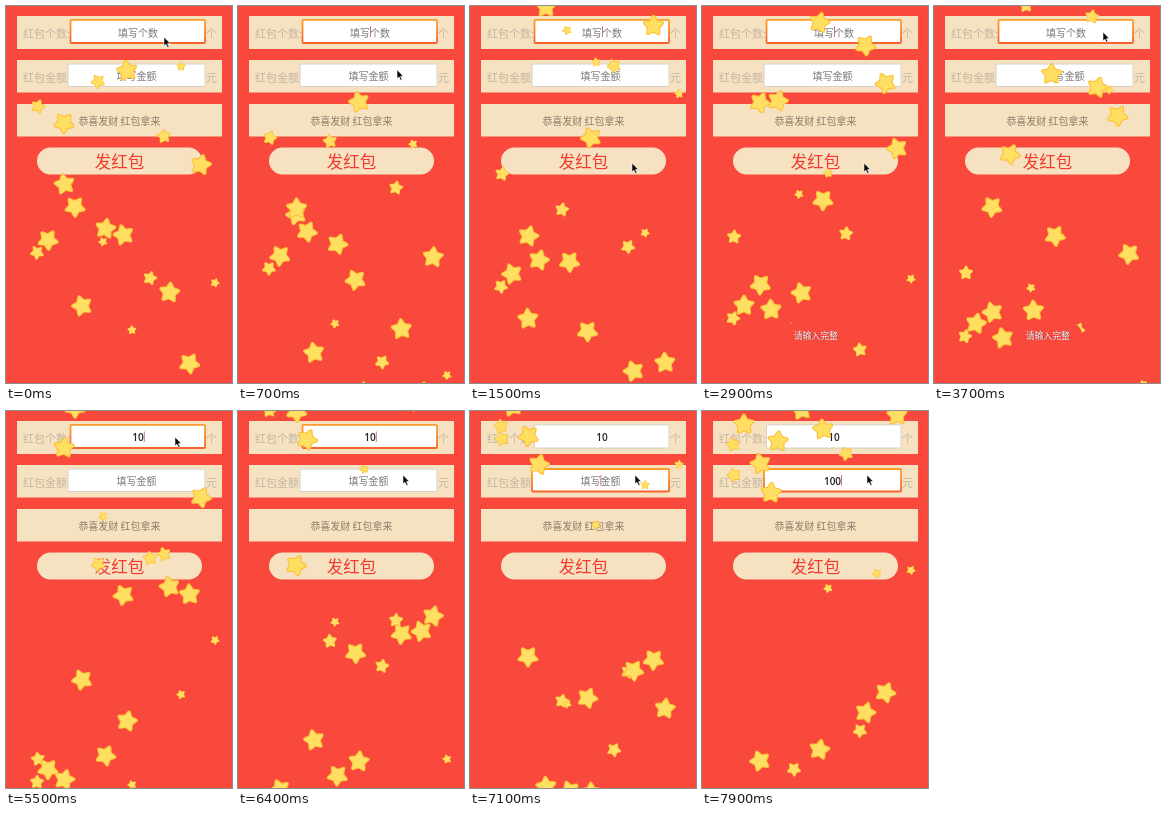
An HTML page that plays this animation: 226 px wide and 377 px high, repeating every 8 s.

```html
<!DOCTYPE html>
<html lang="zh-CN">
<head>
<meta charset="utf-8">
<style>
html, body { margin: 0; width: 100%; height: 100%; overflow: hidden; background: #f9493d; }
svg { display: block; width: 100%; height: 100%; }
text { font: 10px "Noto Sans CJK SC", "Noto Sans CJK", sans-serif; fill: #777; text-anchor: middle; dominant-baseline: central; }
.card { fill: #f6e1c1; }
.label { font-size: 11px; fill: #c3b6a3; text-anchor: start; }
.wish { font-weight: 500; fill: #8b7b69; }
.send { font-size: 16.5px; fill: #f5392f; }
.box { fill: #fff; stroke: #d8d0c6; }
.box.on { stroke: url(#glow); stroke-width: 1.8; }
.filled { font: 600 10px "Open Sans", sans-serif; fill: #222; }
#toast text { font-size: 8.8px; }
</style>
</head>
<body>
<svg viewBox="0 0 226 377">
  <defs>
    <linearGradient id="glow" x2="0" y2="1">
      <stop offset=".2" stop-color="#fb9a2c"/><stop offset="1" stop-color="#f7632f"/>
    </linearGradient>
    <g id="star" stroke-linejoin="round">
      <path class="shape" fill="#fdbd35" stroke="#fdbd35" stroke-width="3.6"/>
      <path class="shape" fill="#ffdf62" stroke="#ffdf62" stroke-width="1.6"/>
    </g>
  </defs>
  <rect width="226" height="377" fill="#f9493d"/>
  <rect class="card" x="11" y="10" width="205" height="33"/>
  <rect class="card" x="11" y="54" width="205" height="32.5"/>
  <rect class="card" x="11" y="98" width="205" height="32.5"/>
  <rect class="card" x="31" y="141.5" width="165" height="27" rx="13.5"/>
  <text class="label" x="17" y="27">红包个数:</text>
  <text class="label" x="17" y="70.5">红包金额:</text>
  <text class="label" x="200" y="27">个</text>
  <text class="label" x="200" y="70.5">元</text>
  <rect class="box" x="64.5" y="13.8" width="134.5" height="23.2" rx="1"/>
  <rect class="box" x="62" y="58" width="137" height="22.5" rx="1"/>
  <text class="value" x="132" y="26"></text>
  <text class="value" x="130.5" y="69.5"></text>
  <rect id="caret" width=".8" height="10.5" fill="#b5554c"/>
  <text class="wish" x="113.5" y="114.5">恭喜发财 红包拿来</text>
  <text class="send" x="113.5" y="155">发红包</text>
  <g id="stars"></g>
  <g id="toast">
    <rect x="80" y="317" width="68" height="24" rx="12" fill="#f9493d"/>
    <text x="114.5" y="329.5" style="fill:#6b2b26">请输入完整</text>
    <text x="114" y="329" style="fill:#fff">请输入完整</text>
  </g>
  <path id="pointer" d="M0 0V9L2 7.2L3.6 10.6L5 10L3.5 6.6H6.2Z" stroke="#fff" stroke-width=".6"/>
</svg>
<script>
const LOOP = 8000, STAGE = 377;
const $ = s => document.querySelector(s), $$ = s => [...document.querySelectorAll(s)];
const show = (el, on) => { el.style.display = on ? '' : 'none'; };

// All stars left the top edge together, HEAD_START seconds before the loop.
// Each size lists its stars as column and speed in px per second.
const HEAD_START = 28.5;
const flock = {
  21: [[121, 44.64], [58, 130.48], [195, 131.94], [58.5, 34.62], [69, 35.42], [99.5, 22.18],
    [117.5, 64.4], [42, 22.58], [163.5, 52.42], [76, 66.89], [183.5, 40.91]],
  14: [[92, 85.42], [32, 45.03], [158, 73.59], [31, 22.65], [144, 119.83]],
  9: [[175, 110.91], [97, 117.06], [209, 132.08], [126, 79.42]]
};

const outline = 'M' + Array.from({ length: 10 }, (_, i) => {
  const a = (i / 5 - .5) * Math.PI, r = i % 2 ? 4.7 : 8.7;
  return [r * Math.cos(a), r * Math.sin(a)];
}).join('L') + 'Z';
$$('.shape').forEach(p => p.setAttribute('d', outline));

const stars = Object.entries(flock).flatMap(([size, list]) =>
  list.map(([x, speed]) => {
    const el = document.createElementNS('http://www.w3.org/2000/svg', 'use');
    el.setAttribute('href', '#star');
    return { x, speed, size: +size, el: $('#stars').appendChild(el) };
  }));

function drawStars(sec) {
  stars.forEach(({ x, speed, size, el }, i) => {
    const y = speed * (HEAD_START + sec) % (STAGE + size + 1) - size / 2;
    const turn = i * 47 + (i * 29 % 60 - 30) * sec;
    el.setAttribute('transform', `translate(${x} ${y}) rotate(${turn}) scale(${size / 20})`);
  });
}

// The pointer rests between glides: [start, x, y]
const GLIDE = 600;
const glides = [[0, 158, 31], [500, 162, 157], [3050, 169, 26], [5800, 165, 64]];

function pointerAt(t) {
  const i = glides.findLastIndex(g => g[0] <= t);
  const [start, ...to] = glides[i], from = glides[Math.max(i - 1, 0)].slice(1);
  const k = Math.min((t - start) / GLIDE, 1), ease = k * k * (3 - 2 * k);
  return from.map((v, j) => v + (to[j] - v) * ease);
}

const KEY_GAP = 200, FOCUS_TIME = 6800;
const fields = [
  { hint: '填写个数', text: '10', start: 5200 },
  { hint: '填写金额', text: '100', start: 7200 }
];
const taps = [-550, 3200, FOCUS_TIME];
const keyTimes = fields.flatMap(f => [...f.text].map((_, i) => f.start + i * KEY_GAP));
const presses = [...taps, ...keyTimes];
const boxes = $$('.box'), values = $$('.value'), caret = $('#caret');

function drawFields(t) {
  const focus = t < FOCUS_TIME ? 0 : 1;
  fields.forEach(({ hint, text, start }, i) => {
    const typed = text.slice(0, Math.max(0, Math.floor((t - start) / KEY_GAP) + 1));
    values[i].textContent = typed || hint;
    values[i].classList.toggle('filled', typed !== '');
    boxes[i].classList.toggle('on', i === focus);
    if (i === focus) {
      caret.setAttribute('x', +values[i].getAttribute('x') + typed.length * 2.9);
      caret.setAttribute('y', values[i].getAttribute('y') - 5.5);
    }
  });
  // The caret blinks once a second, restarting at each key or tap
  const last = Math.max(...presses.filter(p => p <= t));
  show(caret, (t - last) % 1000 < 500);
}

function draw(t) {
  drawStars(t / 1000);
  drawFields(t);
  show($('#toast'), t >= 2600 && t < 5000);
  $('#pointer').setAttribute('transform', `translate(${pointerAt(t)})`);
}

const begin = performance.now();
function tick() {
  const t = (performance.now() - begin) % LOOP;
  draw(Math.floor(t / 100) * 100);
  requestAnimationFrame(tick);
}
tick();
</script>
</body>
</html>
```
